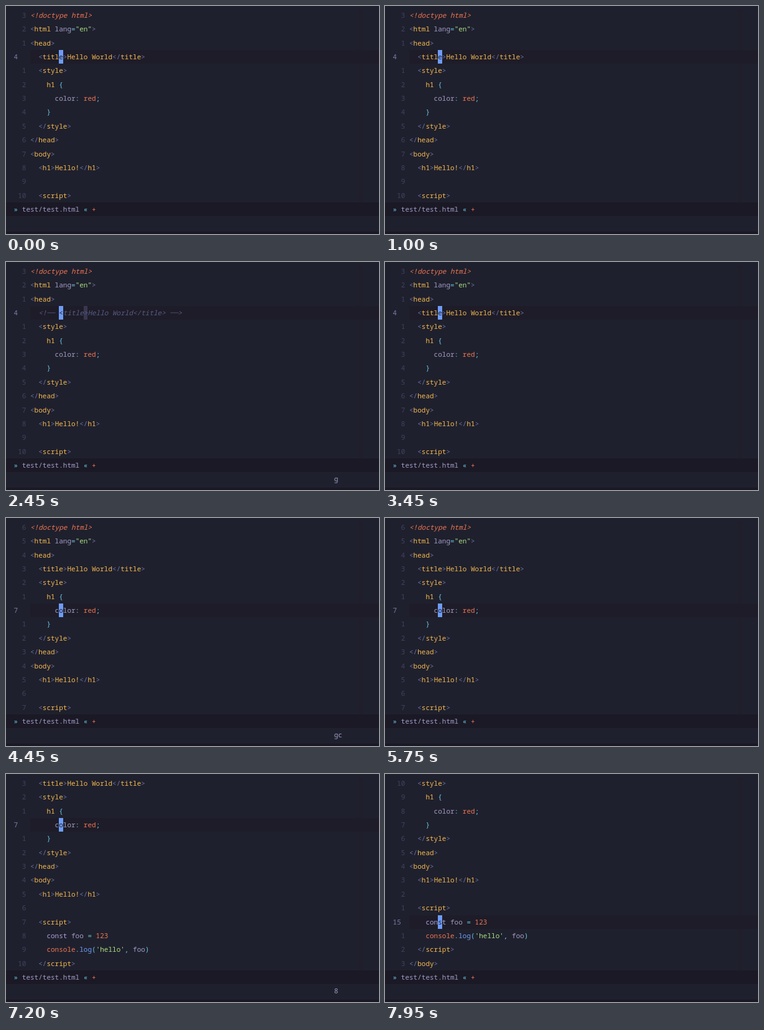
An HTML page for the animation above (8000 ms loop, 600 by 368 pixels).

```html
<!DOCTYPE html>
<html lang="en">
<head>
<meta charset="utf-8">
<title>Toggling comments in an editor</title>
<style>
  html, body { margin: 0; width: 100%; height: 100%; overflow: hidden; background: #1f202d; }
  #stage {
    position: relative; width: 600px; height: 368px; overflow: hidden;
    background: #1f202d; color: #a29dc6;
    font: 11px/22.35px "Noto Sans Mono", "DejaVu Sans Mono", monospace;
    font-variant-ligatures: none; white-space: pre;
  }
  #stage div, .cell { position: absolute; height: 22.35px; }
  #stage #buffer { left: 0; top: 0; width: 600px; height: 368px; }
  .code { left: 39px; width: 561px; }
  .code.current { background: #1e1c28; }
  .num { left: 12.6px; width: 19.8px; text-align: right; color: #41415f; }
  .num.current { text-align: left; color: #7b7ba8; }
  .cell { top: 0; width: 6.6px; }
  .cursor { background: #6e9cf5; color: #1f202d; }
  .match { background: #393750; }
  #stage .ruler { left: 567px; top: 4px; width: 6.6px; height: 313px; background: #201e2b; }
  #stage .status { left: 0; right: 0; top: 316.5px; height: 22.7px; padding-left: 12.6px; background: #1a1925; }
  #stage .bottom { left: 0; right: 0; top: 364px; height: 4px; background: #1b1825; }
  #cmd { left: 527.7px; top: 339.2px; }
  .y { color: #f4b950; } .p { color: #6a73a6; } .t { color: #a29dc6; }
  .c { color: #6ac6e2; } .g { color: #a9df83; } .o { color: #ee7652; }
  .b { color: #6e9cf5; } .v { color: #ada0d8; }
  .d { color: #ee7652; font-style: italic; }
  .k { color: #575c86; font-style: italic; }
</style>
</head>
<body>
<div id="stage">
  <div class="ruler"></div>
  <div id="buffer"></div>
  <div class="status"><span class="c">»</span> test/test.html <span class="c">«</span> <span class="o">+</span></div>
  <div id="cmd"></div>
  <div class="bottom"></div>
</div>
<script>
const ROW = 22.35, COL = 6.6, TOP = 4, ROWS = 14, LOOP = 8000, CURSOR_COL = 7;

// Each "~" starts a run; the character after it is its colour class.
const open = name => `~p<~y${name}~p>`;
const close = name => `~p</~y${name}~p>`;
const source = [
  '~d<!doctype html>',
  '~p<~yhtml ~tlang~c=~g"en"~p>',
  open('head'),
  `~t  ${open('title')}~yHello World${close('title')}`,
  `~t  ${open('style')}`,
  '~y    h1 ~c{',
  '~t      color~c: ~ored~c;',
  '~c    }',
  `~t  ${close('style')}`,
  close('head'),
  open('body'),
  `~t  ${open('h1')}~yHello!${close('h1')}`,
  '',
  `~t  ${open('script')}`,
  '~v    const ~tfoo ~c= ~o123',
  "~o    console~c.~blog~c(~g'hello'~c, ~tfoo~c)",
  `~t  ${close('script')}`,
  close('body')
];
const commented = {
  4: '~k  <!── <title>Hello World</title> ──>',
  7: '~k      /* color: red; */'
};

// time, first visible line, cursor line, is the line commented, pending keys
const steps = [
  [0, 1, 4, false, ''],
  [1250, 1, 4, false, 'g'],
  [1400, 1, 4, false, 'gc'],
  [1550, 1, 4, true, ''],
  [2400, 1, 4, true, 'g'],
  [2500, 1, 4, true, 'gc'],
  [2650, 1, 4, false, ''],
  [3500, 1, 4, false, '3'],
  [3700, 1, 7, false, ''],
  [4250, 1, 7, false, 'g'],
  [4400, 1, 7, false, 'gc'],
  [4550, 1, 7, true, ''],
  [5300, 1, 7, true, 'g'],
  [5450, 1, 7, true, 'gc'],
  [5600, 1, 7, false, ''],
  [6200, 2, 7, false, ''],
  [6350, 3, 7, false, ''],
  [6500, 4, 7, false, ''],
  [7100, 4, 7, false, '8'],
  [7300, 5, 15, false, '']
];

const buffer = document.getElementById('buffer');
const cmd = document.getElementById('cmd');

function add(parent, tag, className, text = '') {
  const node = document.createElement(tag);
  node.className = className;
  node.textContent = text;
  return parent.appendChild(node);
}

function addCell(row, className, text, col) {
  add(row, 'span', `cell ${className}`, text[col]).style.left = col * COL + 'px';
}

function render([, first, cursorLine, isComment, keys]) {
  buffer.replaceChildren();
  for (let i = 0; i < ROWS; i++) {
    const line = first + i;
    const current = line === cursorLine;
    const state = current ? ' current' : '';
    const markup = current && isComment ? commented[line] : source[line - 1];
    const num = add(buffer, 'div', 'num' + state, current ? line : Math.abs(line - cursorLine));
    const row = add(buffer, 'div', 'code' + state);
    num.style.top = row.style.top = TOP + i * ROW + 'px';
    for (const run of markup.split('~').slice(1)) add(row, 'span', run[0], run.slice(1));
    if (!current) continue;
    const text = row.textContent;
    const italic = isComment ? ' k' : '';
    if (text[CURSOR_COL] === '<') addCell(row, 'match' + italic, text, text.indexOf('>', CURSOR_COL));
    addCell(row, 'cursor', text, CURSOR_COL);
  }
  cmd.textContent = keys;
}

const start = performance.now();
let shown;
function tick(now) {
  const time = Math.max(0, now - start) % LOOP;
  const step = steps.findLast(([at]) => at <= time);
  if (step !== shown) render(shown = step);
  requestAnimationFrame(tick);
}
tick(start);
</script>
</body>
</html>
```
